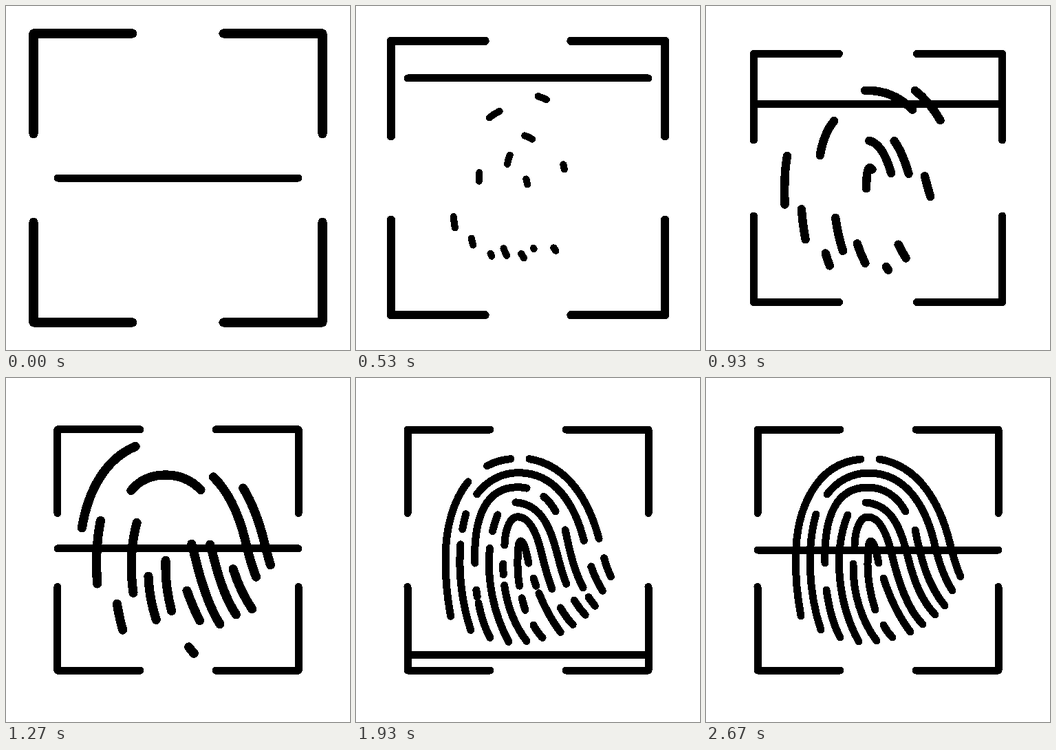
Animation of 500x500 px, one loop 3 s. Source, as an HTML page:

```html
<!DOCTYPE html>
<html lang="en">
<head>
<meta charset="utf-8">
<title>Fingerprint scan</title>
<style>
  html, body { margin: 0; width: 100%; height: 100%; overflow: hidden; background: #fff; }
  svg { display: block; width: 100%; height: 100%; shape-rendering: crispEdges; }
  path { fill: none; stroke: #000; stroke-width: 11; stroke-linecap: round; stroke-linejoin: round; }
</style>
</head>
<body>
<svg viewBox="0 0 500 500">
  <path id="brackets" d="M195 75H75V196.5 M305 75H425V196.5 M195 425H75V303.5 M305 425H425V303.5"/>
  <g id="print"></g>
  <path id="scanner" d="M75 250H425"/>
</svg>
<script>
const LOOP = 3000, FPS = 30;

// Each ridge is drawn from the end where its dash starts travelling.
const ridges = [
  'M138 346C132 314 130 285 130.5 260C131 190 160 124 225 118',
  'M252 118C310 128 340 182 354 238C360 262 364 276 370 288.5',
  'M176 169C191 149 213 138 236 138C290 138 318 185 331 236C338 266 344 286 358 309',
  'M167 366C149 312 146 247 160 198',
  'M173 269C171 200 190 159 235 159C259 159 278 172 290 194',
  'M304 221C313 265 322 300 347 331',
  'M222 383C192 328 184 254 206 199',
  'M232 181C273 184 284 224 294 262C303 298 314 324 333 344',
  'M216 243C217 217 225 202 235 202C254 202 264 230 270 256C280 298 293 336 315 358',
  'M195 377Q181 351 175 308',
  'M248 382C226 353 213 312 214 270',
  'M251 269C247 250 244 237 239.5 237C235 237 235 260 235 272C235 293 239 315 246 337',
  'M297 369Q273 337 258 291',
  'M258 359Q263 369 271 377'
];

const $ = id => document.getElementById(id);
const brackets = $('brackets'), print = $('print'), scanner = $('scanner');

print.innerHTML = ridges.map(d => `<path pathLength="1" d="${d}"/>`).join('');

// cubic-bezier(.5, 0, .5, 1)
function ease(x) {
  if (x <= 0) return 0;
  if (x >= 1) return 1;
  let lo = 0, hi = 1;
  for (let i = 0; i < 24; i++) {
    const t = (lo + hi) / 2;
    if (1.5 * t * (1 - t) + t ** 3 < x) lo = t; else hi = t;
  }
  return lo * lo * (3 - 2 * lo);
}

// Eased value through keys [step, value]
function tween(step, keys) {
  let value = keys[0][1];
  for (let i = 1; i < keys.length; i++) {
    const [from, a] = keys[i - 1], [to, b] = keys[i];
    if (step >= from) value = a + (b - a) * ease((step - from) / (to - from));
  }
  return value;
}

function scale(node, s) {
  node.setAttribute('transform', `translate(250 250) scale(${s}) translate(-250 -250)`);
}

function render(ms) {
  const step = Math.floor(ms % LOOP * FPS / 1000 + 0.1);
  scale(brackets, tween(step, [[0, 1.2], [40, 1]]));
  scale(print, tween(step, [[0, 0.8], [40, 1.2], [60, 1]]));
  const y = tween(step, [[0, 0], [20, -155], [40, 0], [60, 155], [80, 0]]);
  scanner.setAttribute('transform', `translate(0 ${y})`);

  // The dash grows to the full ridge while running once along it.
  const dash = tween(step, [[0, 0], [80, 1]]);
  print.setAttribute('visibility', dash ? 'visible' : 'hidden');
  print.setAttribute('stroke-dasharray', dash < 1 ? `${dash} ${1 - dash}` : 'none');
  print.setAttribute('stroke-dashoffset', -dash);
}

const start = performance.now();
function tick() {
  render(performance.now() - start);
  requestAnimationFrame(tick);
}
tick();
</script>
</body>
</html>
```
